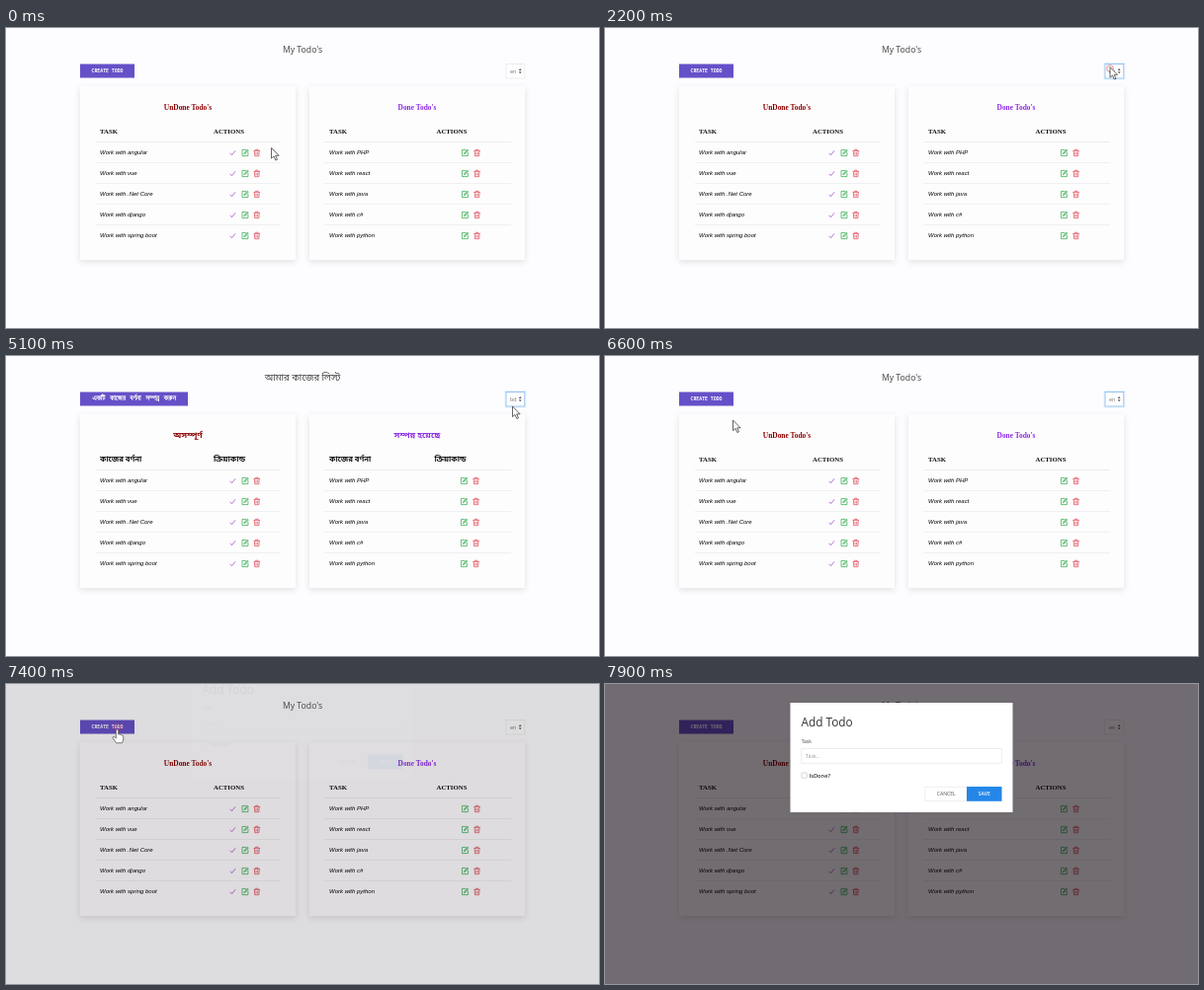
An HTML page that plays this animation: 600 px wide and 304 px high, repeating every 8 s.

```html
<!DOCTYPE html>
<html lang="en">
<head>
<meta charset="utf-8">
<title>Todo list</title>
<style>
  html, body { margin: 0; width: 100%; height: 100%; overflow: hidden; background: #fdfcfe; }
  svg { display: block; width: 100%; height: 100%; }
  text { font-family: "Open Sans", "Noto Sans", "Noto Sans Bengali", sans-serif; white-space: pre; }
  .serif { font-family: "Liberation Serif", "Noto Sans Bengali", serif; font-weight: 700; }
  .mono { font-family: "Noto Sans Mono", "DejaVu Sans Mono", monospace; font-weight: 700; }
  .task { font-family: "Liberation Sans", sans-serif; font-style: italic; }
</style>
</head>
<body>
<svg id="stage" viewBox="0 0 600 304">
  <defs>
    <filter id="soft" x="-10%" y="-10%" width="120%" height="125%">
      <feDropShadow dx="0" dy="2" stdDeviation="3" flood-color="#000" flood-opacity=".11"/>
    </filter>
    <g id="check"><path d="M.9 4 2.5 5.9 6.1 1.4" fill="none" stroke="#a044c8" stroke-width=".75"/></g>
    <g id="edit" fill="none" stroke="#28a745" stroke-width=".7">
      <path d="M4.6 .6H.5V6.8H6.4V3"/>
      <path d="M2.3 5 2.7 3.5 5.9 .3 6.9 1.2 3.7 4.5Z" fill="#8fd19e" stroke-width=".5"/>
    </g>
    <g id="trash" fill="none" stroke="#dc3545" stroke-width=".65">
      <path d="M0 1.6H6.6M2.1 1.4V.4H4.5V1.4M.9 1.8 1.2 6.9H5.4L5.7 1.8M2.5 3V5.7M4.1 3V5.7"/>
    </g>
  </defs>
  <rect width="600" height="304" fill="#fdfcfe"/>
  <g id="page"></g>
  <g id="english"></g>
  <g id="bengali"></g>
  <g id="select">
    <rect id="glow" x="505" y="35.5" width="20.8" height="16.5" fill="none" stroke="#e2effc"/>
    <rect id="box" x="506" y="36.5" width="18.8" height="14.5" fill="#fefefe" stroke-width=".8"/>
    <text id="code" x="510" y="45.7" font-size="5.4" fill="#777"></text>
    <path d="M518.8 43 520.2 41 521.6 43ZM518.8 44.2 520.2 46.2 521.6 44.2Z" fill="#555"/>
  </g>
  <rect id="shade" width="600" height="304" fill="#080008"/>
  <g id="modal"></g>
  <circle id="ring" fill="none" stroke="#e0303c" stroke-width=".8"/>
  <path id="arrow" d="M0 0V10.6L2.5 8.4 4.3 12.5 6 11.8 4.2 7.8H7.6Z" fill="#fff" stroke="#333" stroke-width=".75"/>
  <path id="hand" d="M-1.2 .8Q0-.7 1.2 .8V5.2Q2.1 4.3 3 5.4 4 4.8 4.6 5.9 6 5.6 6.2 7.2V10Q6 12 4.8 13.8H-.8Q-2.5 11.5-4.4 8.8-4.6 6.9-2.9 7.4L-1.2 9Z" fill="#fff" stroke="#444" stroke-width=".7"/>
</svg>
<script>
const DURATION = 8000, STEP = 100;
const $ = id => document.getElementById(id);

function add(parent, tag, attrs, content) {
  const el = document.createElementNS("http://www.w3.org/2000/svg", tag);
  for (const key in attrs) el.setAttribute(key, attrs[key]);
  if (content) el.textContent = content;
  parent.appendChild(el);
  return el;
}
const rect = (g, x, y, width, height, attrs) => add(g, "rect", { x, y, width, height, ...attrs });
const label = (g, x, y, size, fill, content, attrs) =>
  add(g, "text", { x, y, "font-size": size, fill, ...attrs }, content);
const set = (id, attrs) => { for (const key in attrs) $(id).setAttribute(key, attrs[key]); };
const show = (id, on) => set(id, { visibility: on ? "visible" : "hidden" });

const doneIcons = buildPage($("page"));

function buildPage(page) {
  const columns = [
    { card: 75, text: 95, from: 91, to: 278, tasks: ["angular", "vue", ".Net Core", "django", "spring boot"] },
    { card: 307, text: 327, from: 322, to: 511, tasks: ["PHP", "react", "java", "c#", "python"] }
  ];
  const icons = columns.map(({ card, text, from, to, tasks }) => {
    rect(page, card, 59, 218, 176, { fill: "#fefdfe", filter: "url(#soft)" });
    const group = add(page, "g", {});
    tasks.forEach((task, i) => {
      const y = 115.5 + 21 * i;
      add(page, "path", { d: `M${from} ${y}H${to}`, stroke: "#ebeaec", "stroke-width": i ? .7 : .9 });
      label(page, text, y + 12.7, 6, "#000", "Work with " + task, { class: "task" });
      const use = (name, x) => add(group, "use", { href: "#" + name, x, y: y + 7.3 });
      if (card === 75) {
        use("check", 226);
        use("edit", 238.5);
        use("trash", 250.5);
      } else {
        use("edit", 461);
        use("trash", 473.3);
      }
    });
    return group;
  });
  return icons[1];
}

function buildLanguage(g, s) {
  const serif = { class: "serif" }, centred = { class: "serif", "text-anchor": "middle" };
  label(g, 300, 25.2, s.titleSize, "#444", s.title, { "text-anchor": "middle" });
  rect(g, 75, 36.5, s.buttonWidth, 14, { fill: "#6650c8" });
  label(g, 75 + s.buttonWidth / 2, 45.2, s.buttonSize, "#fff", s.button, { class: "mono", "text-anchor": "middle" });
  label(g, 184, 83, s.headSize, "#8b0000", s.undone, centred);
  label(g, 416, 83, s.headSize, "#8a2be2", s.done, centred);
  for (const [x, content] of [[95, s.task], [210, s.actions], [327, s.task], [s.actionsX, s.actions]])
    label(g, x, 106.5, s.columnSize, "#111", content, serif);
}

buildLanguage($("english"), {
  title: "My Todo's", titleSize: 8.7, button: "CREATE TODO", buttonWidth: 55, buttonSize: 4.85,
  undone: "UnDone Todo's", done: "Done Todo's", headSize: 7.4,
  task: "TASK", actions: "ACTIONS", columnSize: 6.8, actionsX: 435.5
});
buildLanguage($("bengali"), {
  title: "আমার কাজের লিস্ট", titleSize: 9.5, button: "একটি কাজের বর্ণনা সম্পন্ন করুন", buttonWidth: 109, buttonSize: 7.7,
  undone: "অসম্পূর্ণ", done: "সম্পন্ন হয়েছে", headSize: 8.4,
  task: "কাজের বর্ণনা", actions: "ক্রিয়াকান্ড", columnSize: 7.5, actionsX: 433.5
});

function buildModal(g) {
  rect(g, 187.5, 19, 225, 111, { fill: "#fff" });
  label(g, 198.5, 42.6, 11.8, "#333", "Add Todo");
  label(g, 198.7, 59.6, 5, "#444", "Task");
  rect(g, 198.9, 65.4, 202.4, 14.8, { fill: "#fff", stroke: "#e8e8ea", "stroke-width": .8 });
  label(g, 203, 75, 5.4, "#999", "Task..");
  rect(g, 199, 90, 5.2, 5.2, { fill: "#fff", stroke: "#bbb", "stroke-width": .6, rx: .8 });
  label(g, 206.4, 95, 5.7, "#333", "IsDone?", { "font-weight": 600 });
  rect(g, 323.8, 104.4, 42.2, 14, { fill: "#fff", stroke: "#ebebed", "stroke-width": .8 });
  label(g, 345.2, 113.3, 5.1, "#555", "CANCEL", { "text-anchor": "middle" });
  rect(g, 366, 104, 35.5, 14.8, { fill: "#2487e8" });
  label(g, 383.8, 113.3, 5.1, "#fff", "SAVE", { "text-anchor": "middle", "font-weight": 600 });
}
buildModal($("modal"));

// Keys are [time, ...values], joined by straight lines.
function tween(keys, t) {
  const next = keys.findIndex(key => key[0] > t);
  if (next < 0) return keys[keys.length - 1].slice(1);
  if (next === 0) return keys[0].slice(1);
  const a = keys[next - 1], b = keys[next], p = (t - a[0]) / (b[0] - a[0]);
  return a.slice(1).map((v, i) => v + (b[i + 1] - v) * p);
}

const pointerPath = [
  [0, 268.5, 121.5], [900, 395, 100], [1800, 511, 39.5], [2300, 511, 39.5], [2700, 513, 58],
  [3700, 513, 58], [4100, 320, 66], [4200, 320, 66], [5100, 512.5, 51], [6000, 512.5, 51],
  [6300, 190, 78], [6500, 190, 78], [6600, 129.5, 65], [6900, 112.5, 46]
];
// time, shade opacity, modal opacity, modal offset
const opening = [
  [7200, 0, 0, -33], [7300, .03, 0, -33], [7400, .13, .05, -32.5], [7500, .51, .35, -20.5],
  [7600, .57, .75, -9], [7700, .57, 1, -3], [7800, .57, 1, 0]
];
const clicks = [[2100, 511, 41], [7300, 112.5, 44]];

function draw(t) {
  const bengali = t >= 3400 && t < 5700;
  show("english", !bengali);
  show("bengali", bengali);
  doneIcons.setAttribute("transform", `translate(${bengali ? -1 : 0})`);

  const focused = t >= 2000 && t < 7200;
  show("glow", focused);
  set("box", { stroke: focused ? "#80b8ee" : "#e9e8eb" });
  $("code").textContent = bengali ? "bd" : "en";

  const [x, y] = tween(pointerPath, t);
  const hover = t > 6600 && y < 51 && x < 130;
  set("arrow", { transform: `translate(${x} ${y})` });
  set("hand", { transform: `translate(${x} ${y})` });
  show("arrow", !hover);
  show("hand", hover && t < 7600);

  const click = clicks.find(([start]) => t >= start && t < start + 300);
  show("ring", !!click);
  if (click) {
    const age = (t - click[0]) / 300;
    set("ring", { cx: click[1], cy: click[2], r: 1.5 + 5.5 * age, opacity: .8 - .3 * age });
  }

  const [shade, opacity, offset] = tween(opening, t);
  set("shade", { opacity: shade });
  set("modal", { opacity, transform: `translate(0 ${offset})` });
}

function tick(now) {
  draw(Math.floor(now % DURATION / STEP) * STEP);
  requestAnimationFrame(tick);
}
draw(0);
requestAnimationFrame(tick);
</script>
</body>
</html>
```
